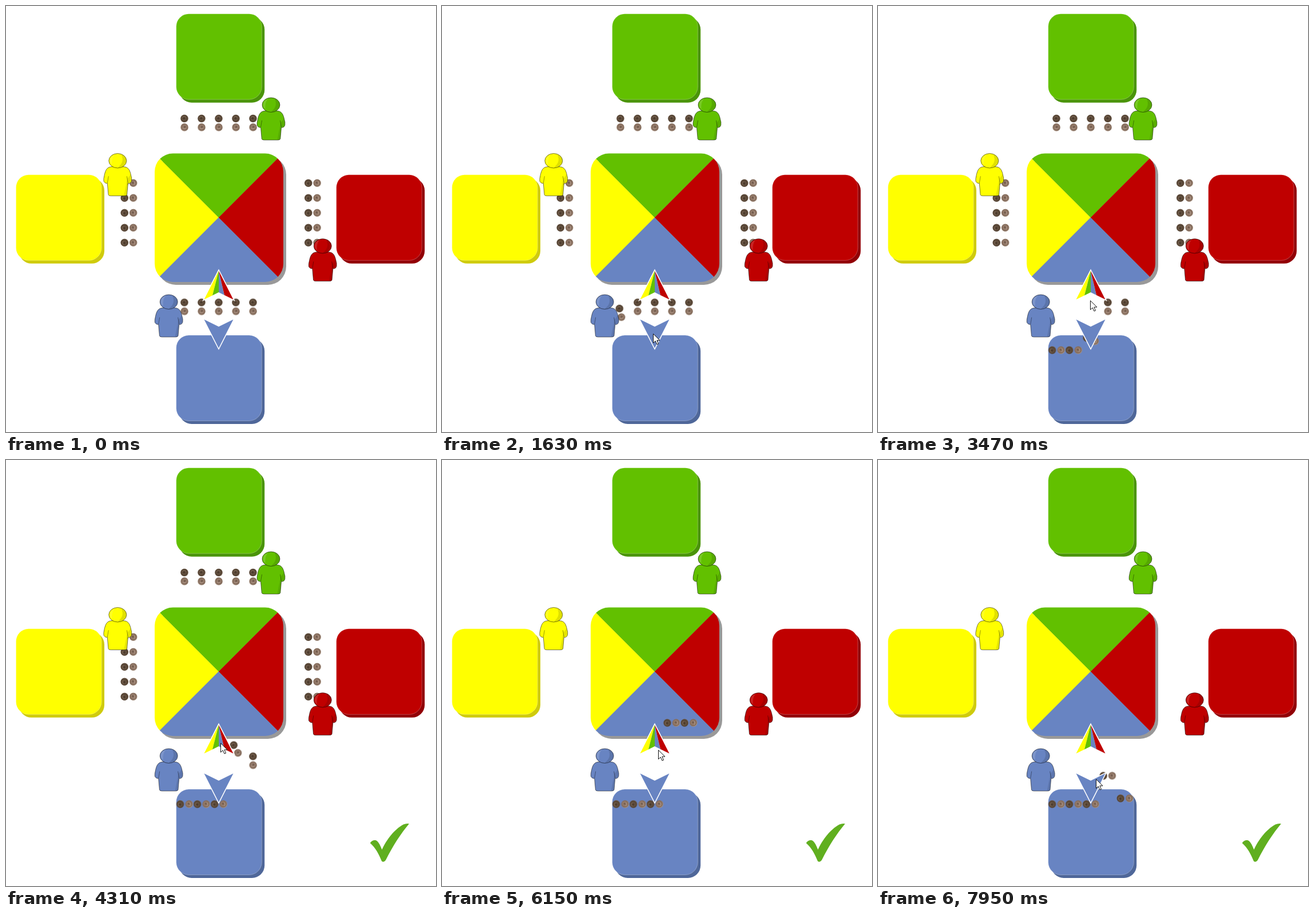
Write an HTML page that moves like this. It is 752x744 px and loops after 8 s.

```html
<!DOCTYPE html>
<html lang="en">
<head>
<meta charset="utf-8">
<title>Board game</title>
<style>
  html, body { margin: 0; width: 100%; height: 100%; overflow: hidden; background: #fff; }
  svg { display: block; width: 752px; height: 744px; }

  .green  { color: #62c000; --dark: #4a9408; }
  .yellow { color: #ffff00; --dark: #cfcb0c; }
  .red    { color: #bf0000; --dark: #920006; }
  .blue   { color: #6884c2; --dark: #4f6799; }

  .anim { animation: 8s linear infinite; }
  .pair { animation-timing-function: cubic-bezier(.28, .1, .32, 1); }

  #p1 { animation-name: p1; }
  #p2 { animation-name: p2; }
  #p3 { animation-name: p3; }
  #p4 { animation-name: p4; }
  #p5 { animation-name: p5; }
  #others { animation-name: vanish; animation-timing-function: step-end; }
  #check { animation-name: check; animation-timing-function: step-end; }
  #pointer { animation-name: enter; animation-timing-function: step-end; }
  #path { animation-name: path; animation-timing-function: ease-in-out; }

  /* three pairs go down to the blue board */
  @keyframes p1 {
    0%, 17.875% { transform: translate(312px, 525.5px) rotate(0deg); }
    35.375%, 100% { transform: translate(312.5px, 601px) rotate(-90deg); }
  }
  @keyframes p2 {
    0%, 26.375% { transform: translate(342px, 525.5px) rotate(0deg); }
    43.875%, 100% { transform: translate(342.5px, 601px) rotate(-90deg); }
  }
  @keyframes p3 {
    0%, 34.75% { transform: translate(372px, 525.5px) rotate(0deg); }
    52.25%, 100% { transform: translate(372.5px, 601px) rotate(-90deg); }
  }
  /* two pairs go up to the middle, then down; the loop cuts their last move short */
  @keyframes p4 {
    0%, 49.75% { transform: translate(402px, 525.5px) rotate(0deg); }
    67.25% { transform: translate(401.8px, 459px) rotate(-90deg); }
    92.19% {
      transform: translate(401.8px, 459px) rotate(-90deg);
      animation-timing-function: cubic-bezier(.384, .088, .567, .609);
    }
    100% { transform: translate(401.8px, 559px) rotate(-90deg); }
  }
  @keyframes p5 {
    0%, 53.75% { transform: translate(432px, 525.5px) rotate(0deg); }
    71.25% { transform: translate(432px, 459px) rotate(-90deg); }
    86.61% {
      transform: translate(432px, 459px) rotate(-90deg);
      animation-timing-function: cubic-bezier(.318, .091, .399, .814);
    }
    100% { transform: translate(432px, 593px) rotate(-90deg); }
  }
  @keyframes vanish { 0% { visibility: visible; } 71%, 100% { visibility: hidden; } }
  @keyframes check { 0% { visibility: hidden; } 50%, 100% { visibility: visible; } }
  @keyframes enter { 0% { visibility: hidden; } 1%, 100% { visibility: visible; } }
  @keyframes path {
    0%, 1% { transform: translate(575px, 713px); }
    10.6%, 11.6% { transform: translate(391px, 576px); }
    14.4% { transform: translate(355px, 559px); }
    16.4%, 40.5% { transform: translate(369px, 572px); }
    45.5% { transform: translate(372px, 480px); }
    48.5%, 74.5% { transform: translate(375px, 494px); }
    76.9% { transform: translate(378px, 506px); animation-timing-function: ease-out; }
    82.75%, 84.4% { transform: translate(380px, 553px); }
    85.75% { transform: translate(368px, 555px); }
    88.25%, 100% { transform: translate(381px, 557px); }
  }
</style>
</head>
<body>
<svg viewBox="0 0 752 744" xmlns="http://www.w3.org/2000/svg">
  <defs>
    <radialGradient id="darkCoin" cx=".45" cy=".45" r=".55">
      <stop offset="0" stop-color="#3f3024"/>
      <stop offset=".45" stop-color="#655241"/>
      <stop offset=".75" stop-color="#524131"/>
      <stop offset="1" stop-color="#6f5c4c"/>
    </radialGradient>
    <radialGradient id="lightCoin" cx=".55" cy=".45" r=".55">
      <stop offset="0" stop-color="#634e41"/>
      <stop offset=".4" stop-color="#987e6d"/>
      <stop offset=".75" stop-color="#806858"/>
      <stop offset="1" stop-color="#ab9686"/>
    </radialGradient>
    <g id="pair">
      <circle cy="-7.700" r="6.800" fill="url(#darkCoin)"/>
      <path d="M-3.500-9.500q3-3 6 0" fill="none" stroke="#7d6856"/>
      <circle cy="7.700" r="6.800" fill="url(#lightCoin)"/>
      <path d="M-3.500 9q3 3 6 0" fill="none" stroke="#b7a090"/>
    </g>
    <g id="column">
      <use href="#pair" transform="translate(0 -52) rotate(-90)"/>
      <use href="#pair" transform="translate(0 -26) rotate(-90)"/>
      <use href="#pair" transform="rotate(-90)"/>
      <use href="#pair" transform="translate(0 26) rotate(-90)"/>
      <use href="#pair" transform="translate(0 52) rotate(-90)"/>
    </g>

    <g id="board">
      <rect x="5" y="5.500" width="149.500" height="149.500" rx="22" fill="var(--dark)"/>
      <rect width="149.500" height="149.500" rx="22" fill="currentColor" stroke="#fff" stroke-opacity=".35" stroke-width=".8"/>
    </g>

    <g id="man" stroke-linejoin="round">
      <path d="M-11 23.500C-19 24-21.500 30-23.200 38Q-25 45-24.300 49Q-22 53-18 52.500L-16.300 72Q-16 74.300-12 74.300H12Q16 74.300 16.300 72L18 52.500Q23 53 24.300 48Q25 43 23.200 38C21.500 30 19 24 11 23.500Z"
        fill="currentColor" stroke="#000" stroke-opacity=".6" stroke-width=".9"/>
      <path d="M18 51Q23 52 23.800 47Q24 42 22 36Q20 42 17 43L11 74Q16 74 16 72Z" fill="#000" fill-opacity=".1"/>
      <path d="M-18 52L-16 40M18 52L16 40" fill="none" stroke="#000" stroke-opacity=".5" stroke-width=".8"/>
      <ellipse cy="13" rx="15.500" ry="12.700" fill="currentColor" stroke="#000" stroke-opacity=".6" stroke-width=".9"/>
      <path d="M6 2Q17 6 15 15Q11 25 0 25Q13 15 6 2Z" fill="#000" fill-opacity=".12"/>
      <path d="M-14 15Q-15 5-5 2Q-11 8-10 20Q-13 18-14 15Z" fill="#fff" fill-opacity=".14"/>
    </g>

    <clipPath id="middle"><rect x="260" y="257.500" width="225" height="224.500" rx="32"/></clipPath>
  </defs>

  <use href="#board" class="green" x="297.700" y="13.700"/>
  <use href="#board" class="yellow" x="17.500" y="294.800"/>
  <use href="#board" class="red" x="577.700" y="294.800"/>
  <use href="#board" class="blue" x="297.700" y="575"/>

  <rect x="265" y="262.500" width="225" height="224.500" rx="32" fill="#999"/>
  <g clip-path="url(#middle)">
    <g transform="translate(371.800 369.500)">
      <path class="green" fill="currentColor" d="M0 0L-120-120H120Z"/>
      <path class="red" fill="currentColor" d="M0 0L120-120V120Z"/>
      <path class="yellow" fill="currentColor" d="M0 0L-120-120V120Z"/>
      <path class="blue" fill="currentColor" d="M0 0L-120 120H120Z"/>
    </g>
  </g>

  <g id="others" class="anim">
    <use href="#pair" x="312" y="204.200"/>
    <use href="#pair" x="342" y="204.200"/>
    <use href="#pair" x="372" y="204.200"/>
    <use href="#pair" x="402" y="204.200"/>
    <use href="#pair" x="432" y="204.200"/>
    <use href="#column" x="215" y="361.300"/>
    <use href="#column" x="536.500" y="361.300"/>
  </g>

  <g id="p1" class="anim pair"><use href="#pair"/></g>
  <g id="p2" class="anim pair"><use href="#pair"/></g>
  <g id="p3" class="anim pair"><use href="#pair"/></g>
  <g id="p4" class="anim pair"><use href="#pair"/></g>
  <g id="p5" class="anim pair"><use href="#pair"/></g>

  <use href="#man" class="green" x="463.500" y="159.800"/>
  <use href="#man" class="yellow" x="195.300" y="257.300"/>
  <use href="#man" class="red" x="553.800" y="406.300"/>
  <use href="#man" class="blue" x="284.700" y="503.800"/>

  <path d="M372 462.500L397.500 512.500 372 500 346.500 512.500Z" fill="#fff" stroke="#fff" stroke-width="3"/>
  <path class="yellow" fill="currentColor" d="M372 462.500L346.500 512.500 361 505.400Z"/>
  <path class="green" fill="currentColor" d="M372 462.500L361 505.400 372 500Z"/>
  <path class="blue" fill="currentColor" d="M372 462.500V500L382 505Z"/>
  <path class="red" fill="currentColor" d="M372 462.500L382 505 397.500 512.500Z"/>
  <path class="blue" fill="currentColor" d="M372 597.500L397.500 547.500 372 560 346.500 547.500Z"
    stroke="#fff" stroke-width="3" paint-order="stroke"/>

  <path id="check" class="anim" fill="#60af1f"
    d="M636.800 669C640 664 646 662.500 649.500 666C654 671 655.500 676 657.500 680.500C665 664 679 645 695 636.500Q700 634.300 705 635.300C691 652 677 673 664 699Q660.500 703.500 657 700.500C652 688 646 677 636.800 669Z"/>

  <g id="pointer" class="anim">
    <g id="path" class="anim">
      <path d="M.500 .700V16.500L4.200 13 7 19 9.500 18 6.900 12H12Z" fill="#fff" stroke="#111"/>
    </g>
  </g>
</svg>
</body>
</html>
```
